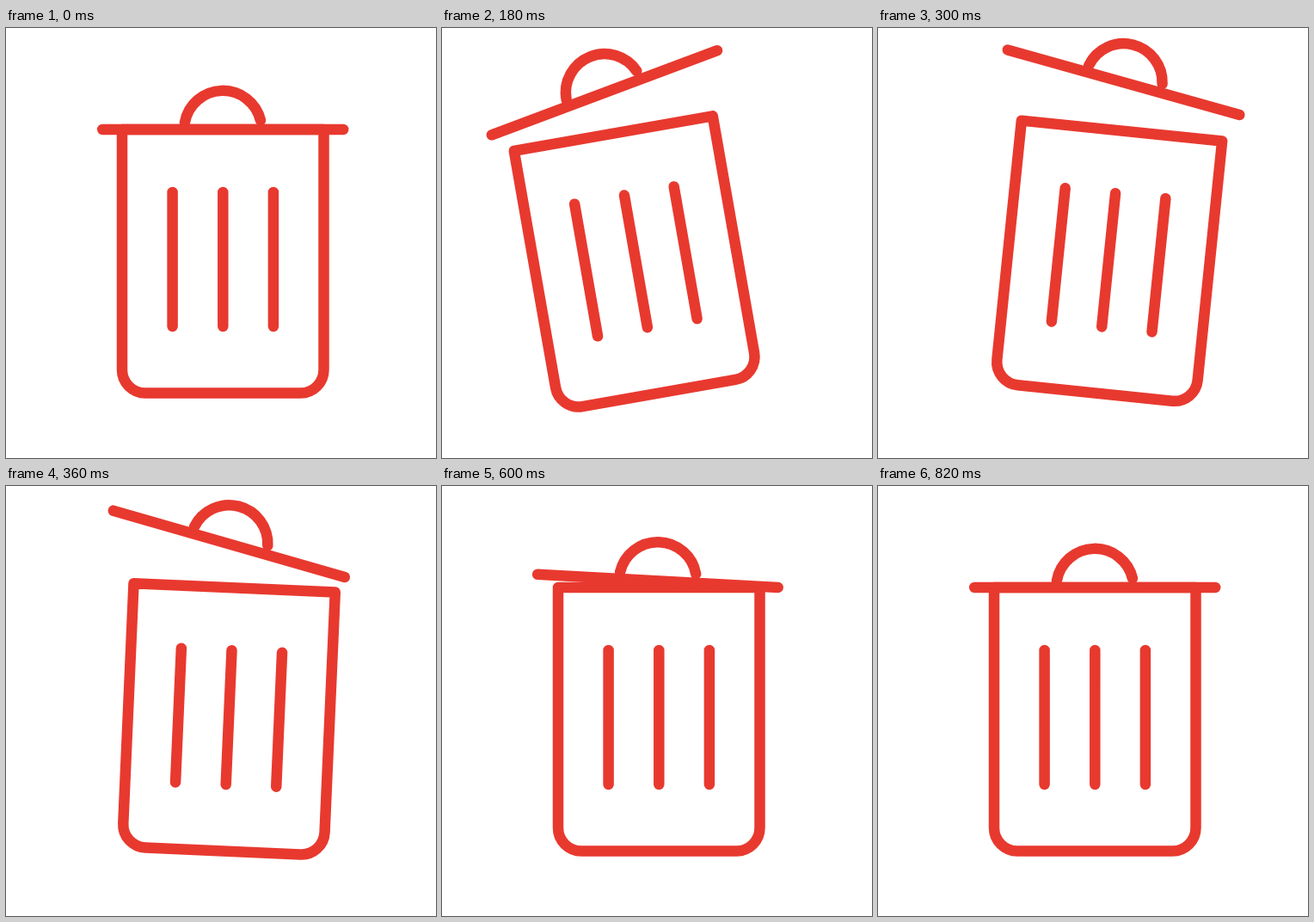
An HTML page for the animation above (840 ms loop, 500 by 500 pixels).

```html
<!DOCTYPE html>
<html lang="en">
<head>
<meta charset="utf-8">
<title>Trash bin</title>
<style>
  html, body { margin: 0; width: 100%; height: 100%; overflow: hidden; background: #fff; }
  svg { display: block; width: 100vw; height: 100vh; }
  path { fill: none; stroke: #e8392f; stroke-width: 12.5; stroke-linecap: round; stroke-linejoin: round; }
</style>
</head>
<body>
<svg viewBox="0 0 500 500">
  <g id="bin">
    <path d="M135 118H369.5V397.5a27 27 0 0 1-27 27H162a27 27 0 0 1-27-27Z"/>
    <path d="M193.6 191V347M252.3 191V347M310.9 191V347"/>
    <g id="lid">
      <path d="M-140 0H140"/>
      <path d="M-44.3-8A45 45 0 0 1 43.8-10.5"/>
    </g>
  </g>
</svg>
<script>
const LOOP = 840, STEP = 20;
const bin = document.getElementById('bin');
const lid = document.getElementById('lid');

// Progress from 0 to 1: slow at both ends, or a quick start that settles.
function ease(t, from, to) {
  const u = Math.min(1, Math.max(0, (t - from) / (to - from)));
  return u * u * (3 - 2 * u);
}
const settle = (t, from, tau) => 1 - Math.exp(-Math.max(0, t - from) / tau);

// The bin leans left, swings over to the right and drops back.
const sway = t => -10 * settle(t, 0, 32) + 15.9 * ease(t, 178, 304) - 5.9 * settle(t, 336, 28);

// The lid opens, tips the other way, levels out and lands on its right end.
const tilt = t => -10.6 * settle(t, 0, 32) + 25 * ease(t, 178, 346) - 14.8 * ease(t, 346, 442)
  + 3.6 * ease(t, 450, 580) - 3.2 * ease(t, 585, 740);

const lift = t => -56.2 * Math.sin(Math.min(1, t / 272) * Math.PI / 2)
  + 23.2 * ease(t, 308, 471) + 33 * ease(t, 380, 700);

const shift = t => -4 * ease(t, 0, 80) + 3 * ease(t, 80, 240)
  - 8 * ease(t, 250, 380) + 9 * ease(t, 440, 650);

function draw(t) {
  bin.setAttribute('transform', `rotate(${sway(t)} 252.3 424.5)`);
  lid.setAttribute('transform', `translate(${252.2 + shift(t)} ${118 + lift(t)}) rotate(${tilt(t)})`);
}

const start = performance.now();
function tick() {
  const t = (performance.now() - start) % LOOP;
  draw(Math.floor(t / STEP) * STEP);
  requestAnimationFrame(tick);
}
draw(0);
requestAnimationFrame(tick);
</script>
</body>
</html>
```
